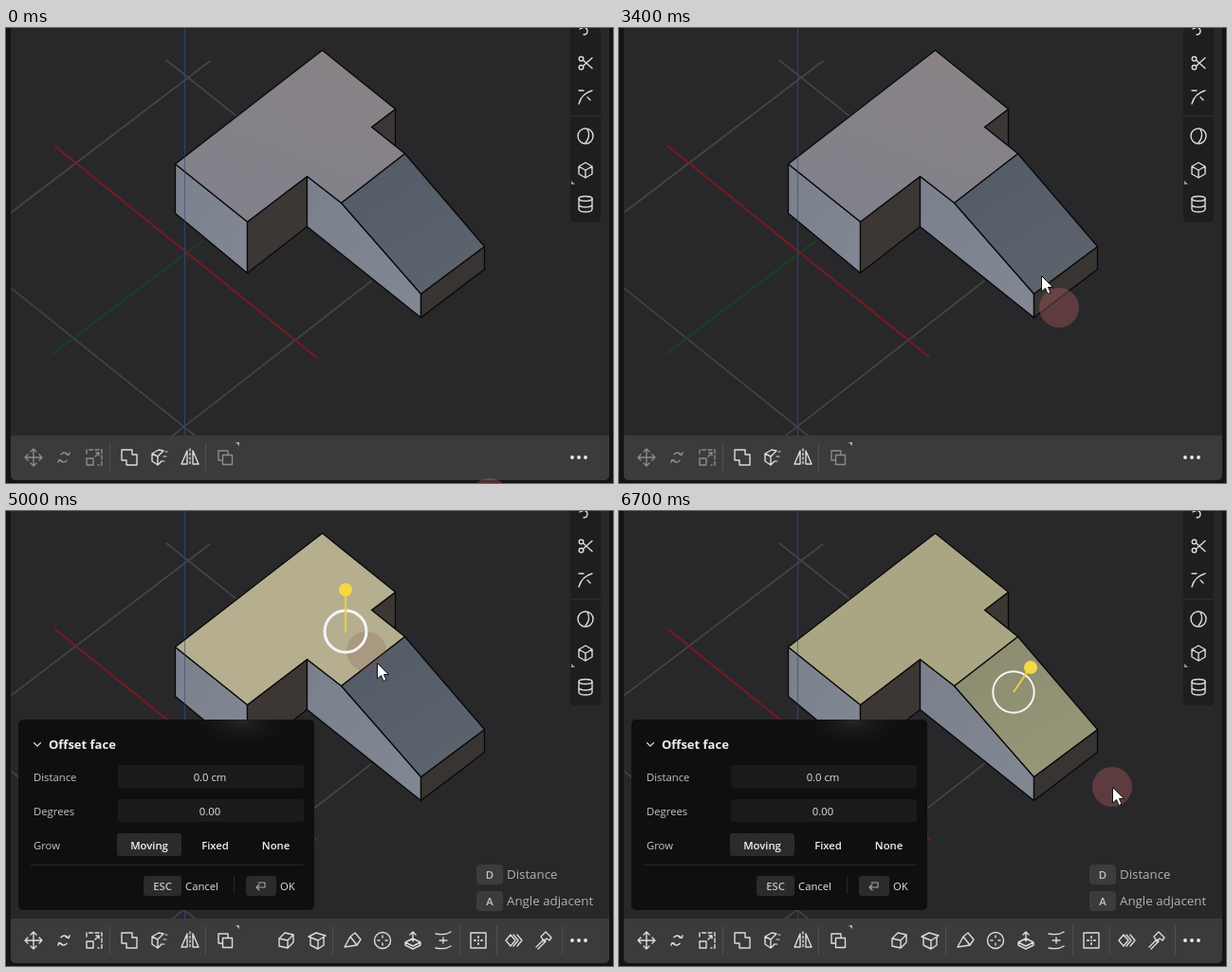
An HTML page for the animation above (8000 ms loop, 640 by 480 pixels).

```html
<!DOCTYPE html>
<html lang="en">
<head>
<meta charset="utf-8">
<title>Offset face</title>
<style>
html, body { margin: 0; width: 100%; height: 100%; overflow: hidden; background: #141416; }
svg { display: block; width: 640px; height: 480px; }
text { font: 11.3px "Open Sans", "Noto Sans", sans-serif; fill: #c4c4c4; }
.mid { text-anchor: middle; }
.strong { font-weight: 600; fill: #f0f0f0; }
.title { font-size: 13px; font-weight: 700; fill: #f0f0f0; }
.hint { font-size: 13.3px; fill: #b2b2b2; }
.lit { fill: #e4e4e4; }
.key { fill: #c4c4c4; }
.icon { fill: none; stroke: #dcdcdc; stroke-width: 1.4; stroke-linejoin: round; stroke-linecap: round; }
.body { stroke: #08080a; stroke-width: 1.3; stroke-linejoin: round; }
.grid { stroke: #454546; stroke-width: 1.6; }
.gizmo { fill: none; stroke: #f5f5f5; }
.gizmo path { stroke: #f0d03c; stroke-width: 2; }
.gizmo .knob { fill: #f5d943; stroke: none; }

.move, .top, .ramp, .show, .dim { animation: 8s step-end infinite; }
.disc { animation-name: disc; }
.arrow { animation-name: arrow; }
.top { animation-name: top; }
.ramp { animation-name: ramp; }
.dim { animation-name: dim; }
.show { visibility: hidden; }
.tools { animation-name: tools; }
.giz1 { animation-name: giz1; }
.giz2 { animation-name: giz2; }
.shift { animation-name: shift; }
.ring { animation: ring 8s step-end infinite; }

@keyframes disc {
  0% { transform: translate(510px, 496px); fill: #da6a704d; }
  8.75% { transform: translate(510px, 496px); animation-timing-function: steps(7); }
  17.5% { transform: translate(514px, 396px); }
  38.75% { transform: translate(514px, 396px); animation-timing-function: steps(3); }
  42.5% { transform: translate(464px, 295px); animation-timing-function: steps(6); }
  50% { transform: translate(359px, 127px); fill: #da6a704d; }
  56.25% { transform: translate(359px, 127px); fill: #7a505038; animation-timing-function: steps(5); }
  62.5% { transform: translate(380px, 148px); fill: #7a505038; animation-timing-function: steps(3); }
  66.25% { transform: translate(416px, 191px); fill: #da6a704d; }
  73.75% { transform: translate(416px, 191px); animation-timing-function: steps(6); }
  81.25%, 100% { transform: translate(520px, 291px); fill: #da6a704d; }
}
@keyframes arrow {
  0% { transform: translate(510px, 496px); }
  8.75% { transform: translate(510px, 496px); animation-timing-function: steps(7); }
  17.5% { transform: translate(514px, 396px); }
  38.75% { transform: translate(514px, 396px); animation-timing-function: steps(3); }
  42.5% { transform: translate(445px, 261px); animation-timing-function: steps(6); }
  50% { transform: translate(358px, 127px); }
  56.25% { transform: translate(358px, 127px); animation-timing-function: steps(5); }
  62.5% { transform: translate(391px, 160px); animation-timing-function: steps(3); }
  66.25% { transform: translate(416px, 191px); }
  73.75% { transform: translate(416px, 191px); animation-timing-function: steps(6); }
  81.25%, 100% { transform: translate(520px, 291px); }
}
@keyframes top {
  0% { fill: url(#topTone); }
  48.75% { fill: #8d8b8d; }
  56.25% { fill: #b5af8f; }
  66.25%, 100% { fill: #aaa683; }
}
@keyframes ramp {
  0% { fill: url(#rampTone); }
  72.5%, 100% { fill: url(#rampPicked); }
}
@keyframes dim { 0% { opacity: .5; } 56.25%, 100% { opacity: 1; } }
@keyframes tools { 0% { visibility: hidden; } 57.5%, 100% { visibility: visible; } }
@keyframes giz1 { 0%, 72.5%, 100% { visibility: hidden; } 57.5% { visibility: visible; } }
@keyframes giz2 { 0% { visibility: hidden; } 72.5%, 100% { visibility: visible; } }
@keyframes shift { 0%, 77.5%, 100% { visibility: hidden; } 70% { visibility: visible; } }
@keyframes ring { 0% { stroke-width: 3; } 66.25%, 100% { stroke-width: 2; } }
</style>
</head>
<body>
<svg viewBox="0 0 640 480">
  <defs>
    <linearGradient id="topTone" x1=".8" y1="0" x2=".3" y2="1">
      <stop stop-color="#898386"/><stop offset="1" stop-color="#81818a"/>
    </linearGradient>
    <linearGradient id="rampTone" x1="0" y1="0" x2=".6" y2="1">
      <stop stop-color="#525b66"/><stop offset="1" stop-color="#5c636d"/>
    </linearGradient>
    <linearGradient id="rampPicked" x1="0" y1="0" x2=".6" y2="1">
      <stop stop-color="#8a8a6e"/><stop offset="1" stop-color="#969678"/>
    </linearGradient>
    <linearGradient id="sideTone" x1="0" y1="0" x2="1" y2="1">
      <stop stop-color="#7a818c"/><stop offset="1" stop-color="#828893"/>
    </linearGradient>
    <radialGradient id="glow">
      <stop stop-color="#262627"/><stop offset="1" stop-color="#0e0e0f" stop-opacity="0"/>
    </radialGradient>
    <clipPath id="view"><path d="M5 0H636V430H5Z"/></clipPath>
    <clipPath id="card"><rect x="13" y="220" width="312" height="201" rx="5"/></clipPath>
  </defs>

  <path d="M5 0H636V471Q636 477 630 477H11Q5 477 5 471Z" fill="#28282a"/>

  <g clip-path="url(#view)" fill="none">
    <g transform="translate(.5 .5)">
      <path class="grid" d="M5 194 215 34M168 33 262 108M5 274 200 430.500M172 432 385 266"/>
      <path d="M49 343 207 224" stroke="#17421f" stroke-width="2"/>
      <path d="M51 124 327 347" stroke="#7c1820" stroke-width="2"/>
    </g>
    <path d="M188.500 0V430" stroke="#2c4272" stroke-width="1.200"/>
  </g>

  <g class="body" transform="translate(.5 .5)">
    <path d="M385 104 410 85V124Z" fill="#3a3735"/>
    <path d="M178 143 254 204V258L178 195Z" fill="url(#sideTone)"/>
    <path d="M254 204 317 156V209L254 258Z" fill="#3c3735"/>
    <path d="M317 156 353 184 437 280V305L317 209Z" fill="url(#sideTone)"/>
    <path d="M437 280 504 230V254L437 305Z" fill="#373432"/>
    <path class="ramp" d="M353 184 420 132 504 230 437 280Z"/>
    <path class="top" d="M333 23 410 85 385 104 420 132 353 184 317 156 254 204 178 143Z"/>
  </g>
  <path d="M188.500 136V204" stroke="#2c4272" stroke-width="1.200" opacity=".5"/>

  <!-- right toolbar -->
  <path d="M595 0H627V201Q627 205 623 205H599Q595 205 595 201Z" fill="#1e1e20"/>
  <path d="M595 93H627" stroke="#29292b" stroke-width="2"/>
  <path d="M596 161V165H600Z" fill="#999"/>
  <g class="icon">
    <path d="M605 1Q612-3 613 3 613 7 609 7"/>
    <g transform="translate(611 37)">
      <circle cx="-4.500" cy="-4.500" r="2.300"/><circle cx="-4.500" cy="4.500" r="2.300"/>
      <path d="M-2.500-3 7 5.500M-2.500 3 7-5.500"/>
    </g>
    <path d="M604 80Q607 69 618 66M604 66H609M613 73 616 76"/>
    <circle cx="611" cy="114" r="8"/><path d="M613 107Q617 114 611 121"/>
    <path d="M611 142 618 146V154L611 158 604 154V146ZM604 146 611 150 618 146M611 150V158"/>
    <ellipse cx="611" cy="180" rx="7" ry="2.500"/>
    <path d="M604 180V191Q604 194 611 194T618 191V180M604 187Q606 189 611 189T618 187"/>
  </g>

  <!-- bottom toolbar -->
  <path d="M5 430H636V471Q636 477 630 477H11Q5 477 5 471Z" fill="#3b3b3c"/>
  <path d="M109.500 438V468M210.500 438V468" stroke="#505051"/>
  <g class="icon">
    <g class="dim">
      <path d="M20 453H38M29 444V462M26 447 29 444 32 447M26 459 29 462 32 459M23 450 20 453 23 456M35 450 38 453 35 456"/>
      <path d="M57 451Q59 446 65 449M65 446V449H62M65 455Q63 460 57 457M57 460V457H60" transform="rotate(20 61 453)"/>
      <path d="M85 449V445H101V461H97" stroke-dasharray="4 2.500"/>
      <path d="M85 454H92V461H85ZM94 452 98 448M95 448H98V451"/>
      <path d="M228 456H224V446H234V450M228.500 450.500H238.500V460.500H228.500Z"/>
    </g>
    <path d="M122 445H133V450H138V461H127V456H122Z"/>
    <path d="M154 449 161 445 166 446M154 449V457L160 461V452L154 449M160 452 166 446M160 461 164 457"/>
    <path d="M168 447H170M166 452H169M164 457H167" stroke-width="1.100"/>
    <path d="M191 446V460H185ZM197 446V460H203Z"/><path d="M194 444V462" stroke-dasharray="2 2.500"/>
  </g>
  <path d="M242 437H246V441Z" fill="#aaa"/>
  <g fill="#eee"><circle cx="597" cy="453" r="1.900"/><circle cx="604" cy="453" r="1.900"/><circle cx="611" cy="453" r="1.900"/></g>

  <g class="show tools">
    <path d="M344.500 438V468M478.500 438V468M517.500 438V468M586.500 438V468" stroke="#505051"/>
    <g class="icon">
      <path d="M288 451 294 445 303 447V455L297 461 288 459ZM288 451 297 453 303 447M297 453V461"/>
      <path d="M319 449 327 445 337 448 329 453ZM321 451V458L329 462 335 458V450M329 453V462"/>
      <path d="M357 460 363 449 368 445 374 452 370 458ZM363 449 370 458"/>
      <circle cx="397" cy="453" r="8.500"/>
      <path d="M397 448V450M397 456V458M392 453H394M400 453H402"/>
      <path d="M421 455 429 451 437 455 429 459ZM421 455V458L429 462 437 458V455M429 454V444M426 447 429 444 432 447"/>
      <path d="M453 446Q463 448 469 444M453 461Q463 463 469 459M457 453H465M461 450V456"/>
      <path d="M490 445H506V461H490Z"/>
      <path d="M498 449V450M498 456V457M494 453H495M501 453H502M498 453H498.100" stroke-width="1.800"/>
      <path d="M527 453 532 447 537 453 532 459ZM535 447 540 453 535 459M539 447 544 453 539 459"/>
      <path d="M559 460 567 452M561 462 569 454M564 449 569 444 575 450 573 453 570 451 567 454Z"/>
    </g>

    <g clip-path="url(#card)">
      <path d="M13 220H325V421H13Z" fill="#0f0f10"/>
      <ellipse cx="248" cy="222" rx="60" ry="32" fill="url(#glow)"/>
    </g>
    <path class="icon" d="M29.500 244.500 33 248 36.500 244.500" style="stroke-width:1.1"/>
    <text class="title" x="45" y="251">Offset face</text>
    <g fill="#1c1a1b">
      <rect x="118" y="268" width="196" height="24" rx="3"/>
      <rect x="118" y="304" width="196" height="24" rx="3"/>
    </g>
    <g fill="#2b2b2d">
      <rect x="117" y="340" width="68" height="24" rx="3"/>
      <rect x="145" y="385" width="40" height="21" rx="3"/>
      <rect x="253" y="385" width="32" height="21" rx="3"/>
    </g>
    <text x="29" y="285">Distance</text>
    <text x="29" y="321">Degrees</text>
    <text x="29" y="357">Grow</text>
    <text class="mid lit" x="215" y="285">0.0 cm</text>
    <text class="mid lit" x="215" y="321">0.00</text>
    <text class="mid strong" x="151" y="357">Moving</text>
    <text class="mid strong" x="220.500" y="357">Fixed</text>
    <text class="mid strong" x="284.500" y="357">None</text>
    <path d="M26 373.500H313M240.500 386V404" stroke="#29292a"/>
    <text class="mid strong key" x="165" y="400">ESC</text>
    <text class="lit" x="189" y="400">Cancel</text>
    <path class="icon" d="M266 392H273V397H264M267 394 264 397 267 400" style="stroke:#aaa;stroke-width:1.1"/>
    <text class="lit" x="289" y="400">OK</text>

    <rect x="496" y="373" width="28" height="21" rx="4" fill="#3c3c3d"/>
    <rect x="496" y="401" width="28" height="21" rx="4" fill="#3c3c3d"/>
    <text class="mid strong key" x="510" y="388">D</text>
    <text class="mid strong key" x="510" y="416">A</text>
    <text class="hint" x="528" y="388">Distance</text>
    <text class="hint" x="528" y="416">Angle adjacent</text>
  </g>

  <circle class="move disc" r="21"/>

  <g class="gizmo show giz1">
    <circle class="ring" cx="358" cy="127" r="22"/>
    <path d="M358 128V88"/><circle class="knob" cx="358" cy="83" r="7"/>
  </g>
  <g class="gizmo show giz2">
    <circle cx="416" cy="191" r="21.700" stroke-width="2"/>
    <path d="M416 191 431 169"/><circle class="knob" cx="434" cy="165" r="7"/>
  </g>

  <g class="show shift">
    <path d="M423.500 241 426.500 244.500H425V248H422V244.500H420.500Z" fill="none" stroke="#111"/>
    <rect x="278" y="434" width="84" height="36" rx="4" fill="#303031" opacity=".88"/>
    <text x="284" y="462" style="font:bold 32px 'Liberation Sans',Arial,sans-serif;fill:#fff;stroke:#111;stroke-width:3px;paint-order:stroke">Shift</text>
  </g>

  <path class="move arrow" d="M.500 .500V17L4.500 13.500 7 19.500 10 18.300 7.500 12.500H12.500Z" fill="#fff" stroke="#111"/>
</svg>
</body>
</html>
```
